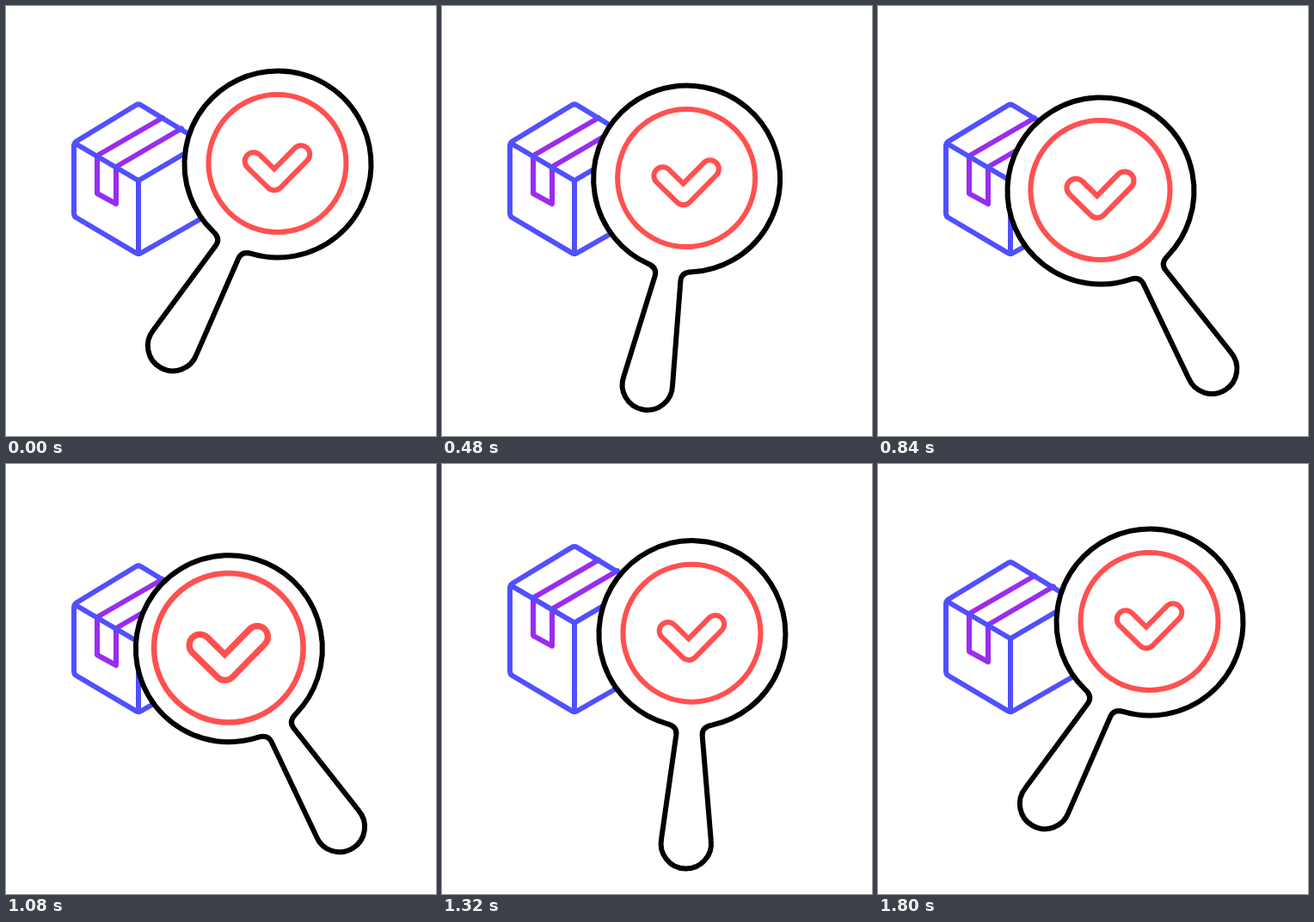
An HTML page for the animation above (2 s loop, 500x500 px).

```html
<!DOCTYPE html>
<html lang="en">
<head>
<meta charset="utf-8">
<title>Package inspection</title>
<style>
  html, body { margin: 0; width: 100%; height: 100%; overflow: hidden; background: #fff; }
  svg { display: block; width: 100vw; height: 100vh; }
</style>
</head>
<body>
<svg viewBox="0 0 500 500" fill="none" stroke-width="6" stroke-linecap="round" stroke-linejoin="round">
  <g stroke="#5050ff">
    <g id="lid">
      <path stroke="#9a2cf0" d="M182 130L106 174V218L128 230V187L204 142.500"/>
      <path d="M79 163Q79 159 82 157.200L151 115.300Q154 113.500 157 115.300L229 159L154 203L80 159.500"/>
    </g>
    <path id="sides"/>
  </g>
  <g id="lens">
    <path id="glass" fill="#fff" stroke="#000" d="M15.200 118Q14 108 26 105.300A108.500 108.500 0 1 0 -26 105.300Q-14 108 -15.200 118L-28.800 239A29.200 29.200 0 1 0 28.800 239Z"/>
    <circle id="ring" cx="-.5" cy="-1" r="80" stroke="#ff5050"/>
    <g id="check">
      <path d="M-28 -3.500L-4 20L27 -11.500" stroke="#ff5050" stroke-width="26.500"/>
      <path d="M-28 -3.500L-4 20L27 -11.500" stroke="#fff" stroke-width="14.500"/>
    </g>
  </g>
</svg>
<script>
const LOOP = 2000, STEP = 40;
const el = id => document.getElementById(id);
const move = (id, value) => el(id).setAttribute('transform', value);

// Cubic bezier easing with control points (x1, 0) and (x2, 1)
const ease = (x1, x2) => u => {
  let lo = 0, hi = 1;
  for (let i = 0; i < 24; i++) {
    const s = (lo + hi) / 2, r = 1 - s;
    if (3 * r * r * s * x1 + 3 * r * s * s * x2 + s ** 3 < u) lo = s; else hi = s;
  }
  return lo * lo * (3 - 2 * lo);
};
const smooth = ease(1 / 3, 2 / 3);

// Keys are [time, value, easing towards this key]
function track(t, keys) {
  if (t <= keys[0][0]) return keys[0][1];
  for (let i = 1; i < keys.length; i++) {
    const [t0, v0] = keys[i - 1], [t1, v1, curve = smooth] = keys[i];
    if (t < t1) return v0 + (v1 - v0) * curve((t - t0) / (t1 - t0));
  }
  return keys[keys.length - 1][1];
}

const slide = [[160, 0], [760, 1], [1040, 1], [1800, 0, ease(.38, .2)]];
const swing = [[160, 30], [760, -32, ease(.72, .64)], [1040, -32], [1800, 30, ease(.57, .05)]];
const pulse = [[760, 0], [1080, 1], [1280, 0]];
const stretch = [[800, 0], [1080, 4], [1280, -21], [1480, 4], [1680, 0]];

function draw(t) {
  const p = track(t, slide), k = track(t, pulse), dy = track(t, stretch);
  move('lens', `translate(${316 - 57 * p} ${184 + 31 * p})`);
  move('glass', `rotate(${track(t, swing)})`);
  move('ring', `scale(${1 + .085 * k})`);
  move('check', `scale(${1 + .21 * k})`);
  move('lid', `translate(0 ${dy})`);
  el('sides').setAttribute('d', `M79 ${163 + dy}V241Q79 244.5 82 246.3L151 287.2
    Q154 289 157 287.2L229 246V${159 + dy}M154 ${203 + dy}V288`);
}

function frame() {
  draw(Math.floor(performance.now() % LOOP / STEP) * STEP);
  requestAnimationFrame(frame);
}
frame();
</script>
</body>
</html>
```
